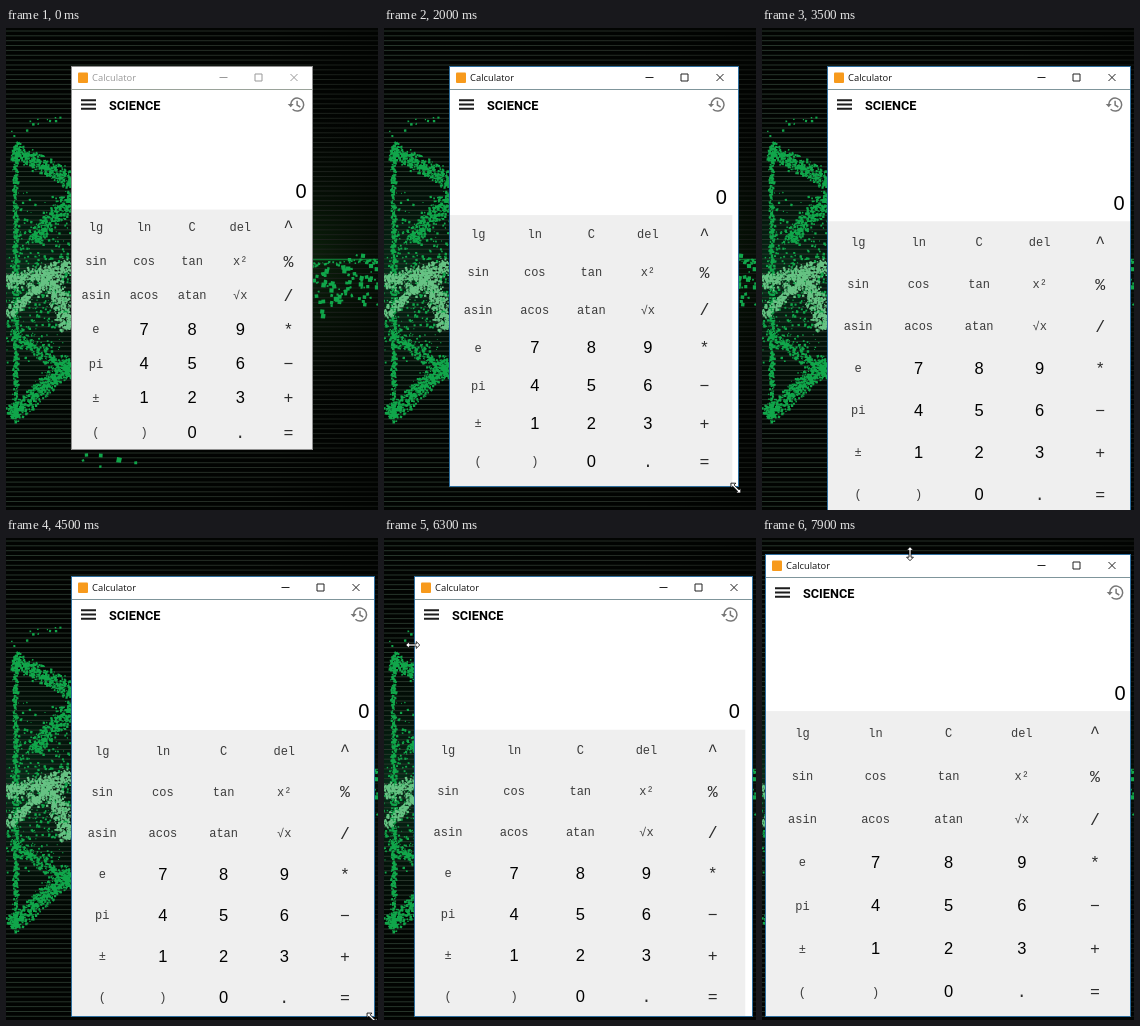
Recreate the animation shown at these times as an HTML page. Size 372 by 482 pixels, loop 8 s.

```html
<!DOCTYPE html>
<html lang="en">
<head>
<meta charset="utf-8">
<title>Resizable calculator</title>
<style>
  html, body { margin: 0; width: 100%; height: 100%; overflow: hidden; background: #000; }
  svg { display: block; width: 372px; height: 482px; }
  text { fill: #000; }
  .caption { font: 9.4px "Open Sans", "Noto Sans", sans-serif; }
  .heading { font: 700 12.7px Roboto, "Liberation Sans", sans-serif; }
  .value { font: 20px "Liberation Sans", sans-serif; text-anchor: end; }
  .key { text-anchor: middle; }
  .fn { font: 12px "Liberation Mono", monospace; fill: #3c3c3c; }
  .digit { font: 16.5px "Liberation Sans", sans-serif; }
  .op { font: 16.5px "Liberation Mono", monospace; fill: #2c2c2c; }
</style>
</head>
<body>
<svg viewBox="0 0 372 482">
  <defs>
    <radialGradient id="glowLeft" gradientUnits="userSpaceOnUse" cx="10" cy="250" r="180">
      <stop offset="0" stop-color="#06301a"/><stop offset="1" stop-color="#020602" stop-opacity="0"/>
    </radialGradient>
    <radialGradient id="glowRight" gradientUnits="userSpaceOnUse" cx="290" cy="235" r="170">
      <stop offset="0" stop-color="#0d260d"/><stop offset="1" stop-color="#020402" stop-opacity="0"/>
    </radialGradient>
    <linearGradient id="scan" gradientUnits="userSpaceOnUse" x1="0" y1="0" x2="372" y2="0">
      <stop offset="0" stop-color="#26352a"/><stop offset=".7" stop-color="#232a23"/><stop offset="1" stop-color="#141814"/>
    </linearGradient>
  </defs>
  <rect width="372" height="482" fill="#020402"/>
  <rect width="372" height="482" fill="url(#glowLeft)"/>
  <rect width="372" height="482" fill="url(#glowRight)"/>
  <g id="backdrop"></g>
  <g id="win"></g>
  <path id="pointer" fill="#fff" stroke="#000" stroke-width=".8" stroke-linejoin="round"/>
</svg>
<script>
const LOOP = 8000, STEP = 100, BAR = 23;
const NS = 'http://www.w3.org/2000/svg';
const byId = id => document.getElementById(id);

function set(el, attrs) {
  for (const k in attrs) el.setAttribute(k, attrs[k]);
  return el;
}

function add(parent, tag, attrs = {}, text) {
  const el = set(document.createElementNS(NS, tag), attrs);
  if (text) el.textContent = text;
  return parent.appendChild(el);
}

const place = (el, x, y) => set(el, { transform: `translate(${x} ${y})` });
const crisp = v => Math.floor(v) + .5;

// Wallpaper: scanlines and speckled strokes
let seed = 17;
function rand() {
  seed = (seed * 16807) % 2147483647;
  return seed / 2147483647;
}

function speckle(x1, y1, x2, y2, width, density = .42, size = 1) {
  const dx = x2 - x1, dy = y2 - y1, len = Math.hypot(dx, dy);
  let d = '';
  for (let i = len * width * density; i > 0; i--) {
    const p = rand(), off = (rand() + rand() - 1) * width * .65 / len;
    const x = x1 + dx * p - dy * off, y = y1 + dy * p + dx * off;
    const s = size * (.8 + rand() * 1.7), k = size * (rand() - .5);
    d += `M${x.toFixed(1)} ${y.toFixed(1)}l${s.toFixed(1)} ${k.toFixed(1)}l${(-k).toFixed(1)} ${s.toFixed(1)}l${(-s).toFixed(1)} ${(-k / 2).toFixed(1)}z`;
  }
  return d;
}

function drawBackdrop() {
  const g = byId('backdrop');
  const green = '#10a64a', pale = '#66c283';
  let lines = '';
  for (let y = 3; y < 482; y += 4.85) lines += `M0 ${y.toFixed(1)}h372`;
  add(g, 'path', { d: lines, stroke: 'url(#scan)' });
  add(g, 'path', { d: 'M306 231.5H372', stroke: '#0c7430', 'stroke-width': 1.5 });

  const edge = speckle(6, 121, 66, 152, 16) + speckle(66, 332, 4, 388, 16);
  const stem = speckle(9, 118, 9, 388, 5);
  const wing = speckle(66, 166, 28, 212, 14) + speckle(66, 346, 8, 305, 14, .25);
  const fill = speckle(0, 250, 66, 258, 150, .05);
  const debris = speckle(306, 262, 372, 250, 50, .025, 1.8) + speckle(306, 236, 372, 232, 5, .15);
  const stray = speckle(0, 104, 66, 86, 10, .02) + speckle(60, 430, 130, 430, 16, .005, 2);
  add(g, 'path', { d: edge + stem + wing + fill + debris + stray, fill: green });

  const body = speckle(0, 254, 66, 238, 16) + speckle(42, 246, 64, 300, 18) + speckle(0, 286, 40, 252, 11);
  add(g, 'path', { d: body, fill: pale });
}

// Window parts
const win = byId('win');
const frame = add(win, 'rect', { fill: '#fff' });
const pad = add(win, 'rect', { fill: '#efefef' });
const rule = add(win, 'path');
const border = add(win, 'rect', { fill: 'none' });

const left = add(win, 'g');
add(left, 'rect', { x: 6.5, y: 6, width: 10, height: 10.5, rx: 1, fill: '#f79a1c' });
const caption = add(left, 'text', { class: 'caption', x: 20.5, y: 14.6 }, 'Calculator');
add(left, 'path', { d: 'M9.5 33.7h15M9.5 38h15M9.5 42.3h15', stroke: '#1c1c1c', 'stroke-width': 2 });
add(left, 'text', { class: 'heading', x: 37.5, y: 43 }, 'SCIENCE');

const controls = add(win, 'path', { d: 'M-93 11h8M-57.5 7.5h7v7h-7zM-22 7.5l7 7m0-7l-7 7', fill: 'none' });

const history = add(win, 'g', { fill: 'none', stroke: '#777', 'stroke-width': 1.5 });
add(history, 'path', { d: 'M-5.6 0A6.5 6.5 0 1 1 -3.7 4.7M.8 -3.8V.6L4 2.5' });
add(history, 'path', { d: 'M-8.6 -.4h6L-5.6 2.8z', fill: '#777', stroke: 'none' });
const value = add(win, 'text', { class: 'value' }, '0');

const ROWS = ['lg ln C del ^', 'sin cos tan x² %', 'asin acos atan √x /', 'e 7 8 9 *',
  'pi 4 5 6 −', '± 1 2 3 +', '( ) 0 . ='];
const DROP = { fn: 4.2, op: 5.8, digit: 5.8 }; // baseline below the row centre

function makeKey(label, row, col) {
  const kind = /\d/.test(label) ? 'digit' : col === 4 || label === '.' ? 'op' : 'fn';
  return { el: add(win, 'text', { class: 'key ' + kind }, label), row, col, drop: DROP[kind] };
}
const keys = ROWS.flatMap((line, row) => line.split(' ').map((label, col) => makeKey(label, row, col)));

// Motion: 0 to 1 between two times
const ramp = (t, from, to) => Math.min(1, Math.max(0, (t - from) / (to - from)));
const ease = p => p * p * (3 - 2 * p);
const mix = (a, b, p) => a + (b - a) * p;

function bounds(t) {
  const settle = ramp(t, 2700, 4500), swing = Math.sin(Math.PI * settle);
  return {
    l: mix(65.5, 3, ramp(t, 5800, 6700)),
    t: mix(38.5, 16, ramp(t, 7300, 7900)),
    r: 306 + 54 * ease(ramp(t, 1200, 2200)) + 8.5 * settle + 5 * swing,
    b: 421 + 62 * ease(ramp(t, 1200, 2600)) - 4.5 * settle + 6 * swing
  };
}

const ARROW = 'M0 0V11L2.6 8.7L4.3 12.4L6 11.6L4.4 8H7.8Z';
const RESIZE = 'M-7 0L-3.5 -3.4V-1H3.5V-3.4L7 0L3.5 3.4V1H-3.5V3.4Z';

function cursorAt(t, w) {
  const resize = (x, y, turn) => ({ d: RESIZE, x, y, turn });
  const arrow = (x, y) => ({ d: ARROW, x, y, turn: 0 });
  const toLeft = ramp(t, 4700, 5600), toTop = ramp(t, 6800, 7200);
  if (t < 900) return null;
  if (t < 1200) return arrow(mix(259, 297.5, ramp(t, 900, 1000)), mix(388, 409.5, ramp(t, 900, 1000)));
  if (t < 4800) return resize(w.r - 2.5, w.b + 1.5, 45);
  if (t < 5600) return arrow(mix(364, 66, toLeft), mix(478, 107, toLeft));
  if (t < 6900) return resize(w.l - 2, 107, 0);
  if (t < 7200) return arrow(mix(3, 153, toTop), mix(107, 40, toTop));
  return resize(mix(153.5, 148, ramp(t, 7300, 7900)), w.t - .3, 90);
}

function render(t) {
  const w = bounds(t);
  const late = bounds(t - STEP); // contents are laid out one step behind the frame
  const width = late.r - late.l, height = late.b - late.t - BAR;
  const active = t >= 1200;
  const x = crisp(w.l), top = crisp(w.t), right = x + width;
  const y = top + BAR, edge = crisp(w.r), bottom = crisp(w.b);
  const display = 120 + (height - 359) * .177;
  const rowH = (height - display) / 7, colW = width / 5;
  const padTop = y + display;

  const box = { x, y: top, width: edge - x, height: bottom - top };
  set(frame, box);
  set(border, { ...box, stroke: active ? '#2f6f9f' : '#8f8f8f' });
  set(rule, { d: `M${x} ${y}H${edge}`, stroke: active ? '#7f959b' : '#9aa39a' });
  set(pad, { x, y: padTop, width: Math.min(right, edge) - x, height: bottom - padTop });

  place(left, x, top);
  caption.style.fill = active ? '#111' : '#999';
  place(controls, edge, top);
  set(controls, { stroke: active ? '#222' : '#999' });
  place(history, right - 15.7, y + 15);
  place(value, right - 5.5, padTop - 11.5);
  for (const k of keys) {
    set(k.el, { x: x + (k.col + .5) * colW + .4, y: padTop + (k.row + .5) * rowH + k.drop });
  }

  const c = cursorAt(t, w), pointer = byId('pointer');
  pointer.style.display = c ? '' : 'none';
  if (c) set(pointer, { d: c.d, transform: `translate(${c.x} ${c.y}) rotate(${c.turn})` });
}

drawBackdrop();
const start = performance.now();
function tick(now) {
  const t = Math.max(0, now - start) % LOOP;
  render(Math.floor(t / STEP) * STEP);
  requestAnimationFrame(tick);
}
render(0);
requestAnimationFrame(tick);
</script>
</body>
</html>
```
